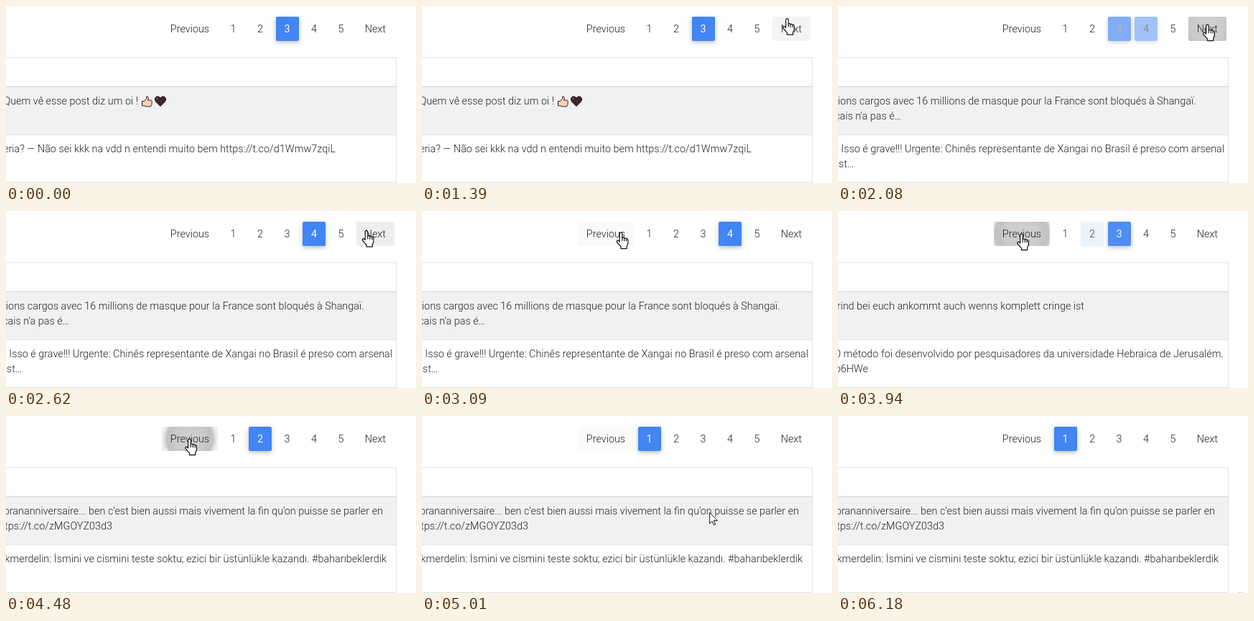
Recreate the animation shown at these times as an HTML page. Size 571x248 px, loop 6.33 s.

```html
<!DOCTYPE html>
<html lang="en">
<head>
<meta charset="utf-8">
<title>Table pagination</title>
<style>
  html, body { margin: 0; width: 100%; height: 100%; overflow: hidden; background: #fff; }
  body { position: relative; font: 300 14.4px Roboto, sans-serif; color: #212529; }
  .page {
    position: absolute; top: 15px; height: 34px; border-radius: 2px;
    line-height: 36px; text-align: center; white-space: nowrap; overflow: hidden;
  }
  svg { position: absolute; left: 0; top: 0; overflow: hidden; }
  text { fill: #212529; text-anchor: end; }
  .line { fill: #dee2e6; }
</style>
</head>
<body>
<svg width="571" height="248">
  <rect y="113" width="543" height="67" fill="#f1f1f1"/>
  <g class="line">
    <rect y="72" width="544" height="1"/>
    <rect y="112" width="544" height="2"/>
    <rect y="180" width="544" height="1"/>
    <rect y="247" width="544" height="1"/>
    <rect x="543" y="72" width="1" height="176"/>
  </g>
  <g id="tweets"></g>
  <g id="emoji" stroke="#2b1a1a" stroke-linejoin="round">
    <path d="M189.500 133.500h3l3-4v-2.500q2.500-1 2.800 1.500l-.6 3.500h4.600q1.800.8.700 2.500q1 1.200-.2 2.500q.7 1.500-.7 2.300q0 1.500-1.500 1.500h-5.500l-2.500-1h-3.100z" fill="#fbd2b0"/>
    <path d="M215 140.500l-6.500-6.500q-2.600-4.500 1-7q3.500-1.200 5.500 2q2-3.200 5.500-2q3.600 2.500 1 7z" fill="#46202a"/>
    <path d="M210 131q-.5-2 1.500-2.500" fill="none" stroke="#a08088"/>
  </g>
</svg>
<div id="pager"></div>
<svg width="571" height="248">
  <g id="hand" fill="#fff" stroke="#111" stroke-width="1.2" stroke-linejoin="round">
    <path d="M5.500 2.500a1.800 1.800 0 0 1 3.600 0V8.200a1.700 1.700 0 0 1 3 .6a1.700 1.700 0 0 1 2.800.8a1.500 1.500 0 0 1 2.300 1.200V16l-1.700 4v3.200H7.300v-2.800L2 14.500a1.700 1.700 0 0 1 1-2.800q1.200 0 2.500 2z"/>
    <path d="M9.100 8v4.500M12.100 9v3.800M14.900 10v3" fill="none"/>
  </g>
  <path id="arrow" d="M.5.500v15.500l3.600-3.500 2.400 5.400 2.200-1-2.400-5.200h5z" fill="#fff" stroke="#111"/>
  <rect id="peek" x="557" y="247" width="7" height="1" fill="#d8d8d8"/>
</svg>
<script>
const LOOP = 6330, START = 690, STEP = 77.2;
const CLICK_LEAD = 160; // from mouse press to page switch
const $ = id => document.getElementById(id);
const clamp = v => Math.max(0, Math.min(1, v));
const mix = (a, b, k) => a + (b - a) * k;

// Per page: [text, right edge, baseline]
const tweets = {
  1: [
    ["orananniversaire... ben c’est bien aussi mais vivement la fin qu’on puisse se parler en", 525, 138],
    ["https://t.co/zMGOYZ03d3", 148, 159],
    ["kmerdelin: İsmini ve cismini teste soktu; ezici bir üstünlükle kazandı. #baharıbeklerdik", 530, 205]
  ],
  2: [
    ["rind bei euch ankommt auch wenns komplett cringe ist", 343, 138],
    ["O método foi desenvolvido por pesquisadores da universidade Hebraica de Jerusalém.", 537, 205],
    ["o6HWe", 42, 226]
  ],
  3: [
    ["Quem vê esse post diz um oi !", 184, 138],
    ["eria? — Não sei kkk na vdd n entendi muito bem https://t.co/d1Wmw7zqiL", 459, 205]
  ],
  4: [
    ["tions cargos avec 16 millions de masque pour la France sont bloqués à Shangaï.", 498.6, 138],
    ["nçais n'a pas é…", 88, 159],
    ["Isso é grave!!! Urgente: Chinês representante de Xangai no Brasil é preso com arsenal", 538, 205],
    ["est…", 22, 226]
  ]
};

const switches = [
  { at: 1980, from: 3, to: 4, button: "Next", x: 515, y: 29 },
  { at: 3400, from: 4, to: 3, button: "Previous", x: 256, y: 32 },
  { at: 3912, from: 3, to: 2, button: "Previous", x: 256, y: 32 },
  { at: 4480, from: 2, to: 1, button: "Previous", x: 256, y: 32 }
];
const hovers = { Next: [1190, 2640], Previous: [3000, 4750] };

// Pointer hotspot: [time, x, y]
const path = [
  [690, 463, 238], [1000, 500, 110], [1310, 503, 19], [1385, 508.5, 17], [1465, 508.5, 17],
  [1695, 514.5, 25.5], [2540, 514.5, 25.5], [2620, 502, 27], [2850, 404, 31],
  [3085, 276, 29.5], [3240, 255.5, 31.5], [4640, 255.5, 31.5], [4710, 272, 44], [5160, 527, 225]
];

const buttons = ["Previous", 1, 2, 3, 4, 5, "Next"].map((label, i) => {
  const el = document.createElement("div");
  const left = i === 0 ? 217 : 300.6 + (i - 1) * 37.45;
  const width = i === 0 ? 78 : i === 6 ? 53 : 32;
  el.className = "page";
  el.textContent = label;
  el.style.left = left + "px";
  el.style.width = width + "px";
  $("pager").append(el);
  return { label, el, left, width };
});

for (const [page, lines] of Object.entries(tweets)) {
  const group = document.createElementNS("http://www.w3.org/2000/svg", "g");
  group.id = "page" + page;
  group.innerHTML = lines.map(([s, x, y]) => `<text x="${x}" y="${y}">${s}</text>`).join("");
  $("tweets").append(group);
}

const show = (id, on) => { $(id).style.display = on ? "" : "none"; };

function activeLevel(page, t) {
  let level = page === 3 ? 1 : 0;
  for (const s of switches) {
    if (t < s.at) break;
    if (s.to === page) level = clamp((t - s.at) / 200);
    if (s.from === page) level = 1 - clamp((t - s.at) / 300);
  }
  return level;
}

function ripple({ label, left, width }, t) {
  const click = switches.filter(s => s.button === label && t >= s.at - CLICK_LEAD).pop();
  if (!click) return "none";
  const age = t - click.at + CLICK_LEAD;
  const strength = 1 - clamp((age - 290) / 360);
  if (!strength) return "none";
  const radius = 49.5 * width * 0.03 * (1 - (1 - clamp(age / 750)) ** 1.7);
  const stops = [[.13, 0], [.15, 57], [.18, 71], [.18, 86], [0, 100]]
    .map(([a, at]) => `rgba(0,0,0,${a * strength}) ${at}%`);
  return `radial-gradient(circle ${radius + 0.1}px at ${click.x - left}px ${click.y - 15}px, ${stops})`;
}

function drawButton(button, t) {
  const { label, el } = button, style = el.style;
  if (hovers[label]) {
    const [on, off] = hovers[label];
    const hover = clamp((t - on) / 300) * (1 - clamp((t - off) / 200));
    style.backgroundColor = `rgba(238,238,238,${hover})`;
    style.backgroundImage = ripple(button, t);
    return;
  }
  const level = activeLevel(label, t);
  style.backgroundColor = `rgba(66,133,244,${level})`;
  style.color = `rgb(${[33, 37, 41].map(c => Math.round(mix(c, 255, level)))})`;
  style.fontWeight = level > 0.4 ? 400 : 300;
  style.boxShadow = `0 2px 5px rgba(0,0,0,${.16 * level}), 0 2px 10px rgba(0,0,0,${.12 * level})`;
}

function drawPointer(t) {
  const visible = t >= START && t < 5230;
  let i = 0;
  while (i < path.length - 2 && t >= path[i + 1][0]) i++;
  const [a, b] = [path[i], path[i + 1]];
  const k = clamp((t - a[0]) / (b[0] - a[0]));
  const x = mix(a[1], b[1], k), y = mix(a[2], b[2], k);
  const onLink = y < 49;
  show("hand", visible && onLink);
  show("arrow", visible && !onLink);
  $("hand").setAttribute("transform", `translate(${x - 7.3} ${y})`);
  $("arrow").setAttribute("transform", `translate(${x} ${y})`);
  show("peek", t > 6150);
}

function draw() {
  // The picture advances in even steps, like a screen recording
  const now = performance.now() % LOOP;
  const t = now < START ? 0 : START + STEP * Math.floor((now - START) / STEP);
  const last = switches.filter(s => t >= s.at - 30).pop();
  const page = last ? last.to : 3;
  for (const p in tweets) show("page" + p, +p === page);
  show("emoji", page === 3);
  buttons.forEach(b => drawButton(b, t));
  drawPointer(t);
  requestAnimationFrame(draw);
}
draw();
</script>
</body>
</html>
```
